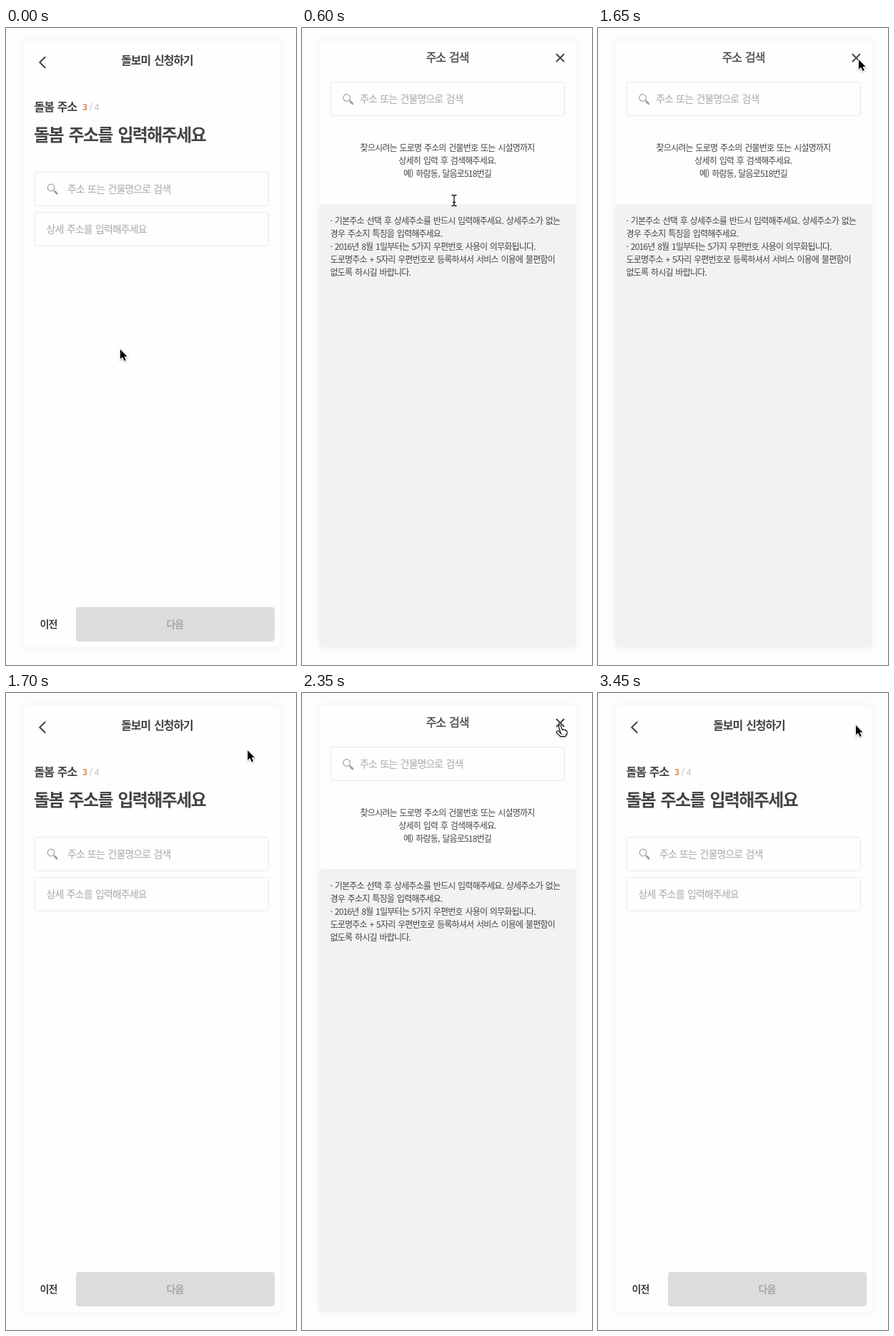
An HTML page that plays this animation: 406x890 px, repeating every 3500 ms.

```html
<!DOCTYPE html>
<html lang="ko">
<head>
<meta charset="utf-8">
<title>주소 입력</title>
<style>
  html, body { margin: 0; width: 100%; height: 100%; overflow: hidden; background: #fdfdfd; }
  svg { display: block; width: 406px; height: 890px; }
  text {
    font: 14px "Noto Sans CJK KR", "Noto Sans CJK", sans-serif;
    letter-spacing: -.067em; word-spacing: .1em; fill: #444;
  }
  .title { font-size: 16px; }
  .heading { font-size: 24px; }
  .small { font-size: 12px; }
  .bold { font-weight: 700; }
  .medium { stroke: #444; stroke-width: .3; }
  .center { text-anchor: middle; }
  .hint { fill: #a8a8a8; }
  .count { fill: #bdbdbd; }
  .current { fill: #e9825c; }
  .card { fill: #fefefe; filter: drop-shadow(0 0 5px rgba(0, 0, 0, .05)); }
  .field { fill: #fefefe; stroke: #e8e8e8; }
  .line { fill: none; stroke: #444; stroke-width: 2; }
  .cursor { filter: drop-shadow(0 1px 1px rgba(0, 0, 0, .3)); }
</style>
</head>
<body>
<svg viewBox="0 0 406 890">
  <defs>
    <g id="lens" fill="none" stroke="#a3a09e">
      <circle r="4.8" stroke-width="1.2"/>
      <path d="M3.6 3.6L5 5" stroke-width="1.4"/>
      <path d="M5.6 5.6L8.2 8.2" stroke-width="3" stroke-linecap="round"/>
    </g>
    <rect id="box" class="field" x="40.5" width="327" height="47" rx="3"/>
    <path id="fingers" d="M0 2L3 11M4.4 7.5V12M6.6 8V12M8.4 9V12M-3 9.5L1.5 14H7"
      fill="none" stroke-linecap="round" stroke-linejoin="round"/>
  </defs>

  <g id="form">
    <rect class="card" x="24" y="18" width="360" height="847" rx="8"/>
    <path class="line" d="M55.2 40.2L47.2 48L55.2 55.8"/>
    <text class="title bold center" x="211.5" y="51">돌보미 신청하기</text>
    <text class="title bold" x="39.5" y="116">돌봄 주소</text>
    <text class="small bold current" x="107" y="115">3</text>
    <text class="small count" x="116.5" y="115">/</text>
    <text class="small count" x="124" y="115">4</text>
    <text class="heading bold" x="39" y="158">돌봄 주소를 입력해주세요</text>
    <use href="#box" y="201.5"/>
    <use href="#lens" x="63" y="223"/>
    <text class="hint" x="86" y="230">주소 또는 건물명으로 검색</text>
    <use href="#box" y="257.5"/>
    <text class="hint" x="56.5" y="286">상세 주소를 입력해주세요</text>
    <text class="bold" x="47.5" y="838">이전</text>
    <rect x="98" y="809" width="278" height="48" rx="4" fill="#dcdcdc"/>
    <text class="bold hint center" x="236.5" y="838">다음</text>
  </g>

  <g id="search">
    <rect class="card" x="24" y="18" width="360" height="847" rx="3"/>
    <rect x="24" y="246" width="360" height="619" rx="2" fill="#f2f2f2"/>
    <text class="title medium center" x="203.5" y="47">주소 검색</text>
    <path class="line" d="M356 36.3L367 47.3M367 36.3L356 47.3"/>
    <use href="#box" y="75.5"/>
    <use href="#lens" x="62.5" y="97.5"/>
    <text class="hint" x="81" y="104">주소 또는 건물명으로 검색</text>
  </g>

  <g id="pointer">
    <path id="arrow" class="cursor" stroke="#fff" paint-order="stroke" stroke-width="2"
      d="M0 0V13.6L3.2 10.7L5.6 16L7.8 15L5.5 9.9H9.6Z"/>
    <path id="beam" fill="none" stroke="#111" stroke-width="1.3"
      d="M-3.5 -7.5H-1.5L0 -6L1.5 -7.5H3.5M0 -6V6M-3.5 7.5H-1.5L0 6L1.5 7.5H3.5M-2 2.5H2"/>
    <g id="hand" class="cursor">
      <use href="#fingers" stroke="#111" stroke-width="4.4"/>
      <use href="#fingers" stroke="#fff" stroke-width="2.2"/>
    </g>
  </g>
</svg>
<script>
  const LOOP = 3500, STEP = 50, LINE_HEIGHT = 18;
  const byId = id => document.getElementById(id);
  const show = (id, on) => byId(id).setAttribute("display", on ? "inline" : "none");

  function addLines(x, y, style, lines) {
    lines.forEach((line, i) => {
      const text = document.createElementNS("http://www.w3.org/2000/svg", "text");
      text.setAttribute("x", x);
      text.setAttribute("y", y + i * LINE_HEIGHT);
      text.setAttribute("class", style);
      text.textContent = line;
      byId("search").append(text);
    });
  }
  addLines(203.5, 172, "small center", [
    "찾으시려는 도로명 주소의 건물번호 또는 시설명까지",
    "상세히 입력 후 검색해주세요.",
    "예) 하람동, 달음로518번길"
  ]);
  addLines(39.5, 274, "small", [
    "· 기본주소 선택 후 상세주소를 반드시 입력해주세요. 상세주소가 없는",
    "경우 주소지 특징을 입력해주세요.",
    "· 2016년 8월 1일부터는 5가지 우편번호 사용이 의무화됩니다.",
    "도로명주소 + 5자리 우편번호로 등록하셔서 서비스 이용에 불편함이",
    "없도록 하시길 바랍니다."
  ]);

  const point = (x, y) => ({ x, y });
  const home = point(160, 449);

  // Each move slows down towards its end; via bends it into a curve.
  const moves = [
    { start: 0, end: 500, to: point(213, 241), power: 1.5 },
    { start: 1050, end: 1550, to: point(365, 44), power: 1.7, via: point(483, 280) },
    { start: 1650, end: 2000, to: point(236, 219), power: 1.5 },
    { start: 2100, end: 2350, to: point(361, 45), power: 6 }
  ];

  function bend(a, via, b, u) {
    const mix = (p, q) => p + (q - p) * u;
    return mix(mix(a, via), mix(via, b));
  }

  function pointerAt(t) {
    let at = home;
    for (const { start, end, to, power, via } of moves) {
      if (t < start) break;
      const u = 1 - (1 - Math.min(1, (t - start) / (end - start))) ** power;
      const mid = via || point((at.x + to.x) / 2, (at.y + to.y) / 2);
      at = point(bend(at.x, mid.x, to.x, u), bend(at.y, mid.y, to.y, u));
    }
    return at;
  }

  const within = (v, low, high) => v >= low && v < high;
  const searchShown = t => within(t, 600, 1700) || within(t, 2100, 2850);
  // The cursor shape notices a page change only at the next hover check.
  const searchHovered = t => within(t, 950, 1650) || within(t, 2150, 3300);

  function shapeAt(t, { x, y }) {
    if (searchHovered(t)) return within(x, 350, 372) && within(y, 30, 54) ? "hand" : "arrow";
    return within(x, 40, 368) && within(y, 201, 305) ? "beam" : "arrow";
  }

  function draw(now) {
    const t = Math.floor((now % LOOP) / STEP) * STEP;
    const at = pointerAt(t), shape = shapeAt(t, at);
    show("search", searchShown(t));
    show("form", !searchShown(t));
    for (const id of ["arrow", "beam", "hand"]) show(id, id === shape);
    byId("pointer").setAttribute("transform", `translate(${at.x} ${at.y})`);
  }

  const begin = performance.now();
  function tick() {
    draw(performance.now() - begin);
    requestAnimationFrame(tick);
  }
  tick();
</script>
</body>
</html>
```
